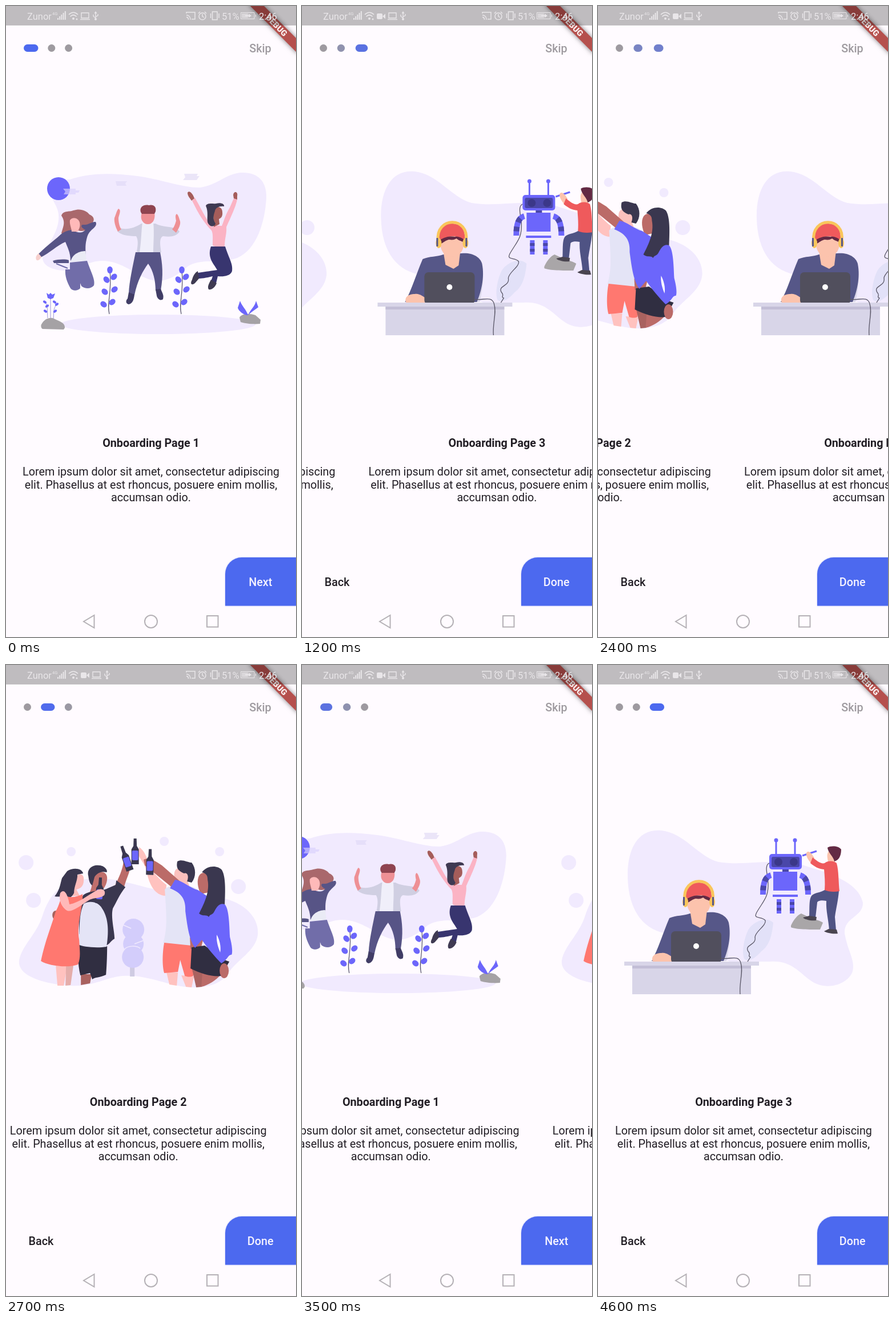
An HTML page with a canvas for the animation above (4.7 s loop, 508 by 1102 pixels).

```html
<!DOCTYPE html>
<html lang="en">
<head>
<meta charset="utf-8">
<title>Onboarding</title>
<style>
html, body { margin: 0; width: 100%; height: 100%; overflow: hidden; background: #fffbff; }
canvas { display: block; width: 508px; height: 1102px; }
</style>
</head>
<body>
<canvas id="stage"></canvas>
<script>
const W = 508, H = 1102, LOOP = 4700, STEP = 100;
const canvas = document.getElementById('stage');
const g = canvas.getContext('2d');
const dpr = window.devicePixelRatio || 1;
canvas.width = W * dpr;
canvas.height = H * dpr;

const BLUE = '#4c69ef', VIOLET = '#6c66fb', LILAC = '#f1eafe', INK = '#221e25';
const NAVY = '#3a374f', NIGHT = '#302e41', CORAL = '#ff7870';
const BROWN = '#bb6b68', UMBER = '#a9625f', ROSE = '#ffc2bf', STATUS = '#e9e6e9';

// ---- drawing helpers ----
const paths = {};
const path = d => paths[d] || (paths[d] = new Path2D(d));
function fill(color, ...list) {
  g.fillStyle = color;
  for (const d of list) g.fill(path(d));
}
function line(color, width, ...list) {
  g.strokeStyle = color;
  g.lineWidth = width;
  for (const d of list) g.stroke(path(d));
}
function oval(color, x, y, rx, ry = rx, turn = 0) {
  g.fillStyle = color;
  g.beginPath();
  g.ellipse(x, y, rx, ry, turn, 0, 7);
  g.fill();
}
function rect(color, x, y, w, h, r = 0) {
  g.fillStyle = color;
  g.beginPath();
  g.roundRect(x, y, w, h, r);
  g.fill();
}
function text(s, x, y, { color = INK, size = 19.76, weight = 400, align = 'center' } = {}) {
  g.font = `${weight} ${size}px Roboto, sans-serif`;
  g.textAlign = align;
  g.fillStyle = color;
  g.fillText(s, x, y);
}
function at(x, y, turn, draw) {
  g.save();
  g.translate(x, y);
  g.rotate(turn);
  draw();
  g.restore();
}
function shaded(color, blur, draw) {
  g.save();
  g.shadowColor = color;
  g.shadowBlur = blur * dpr;
  draw();
  g.restore();
}

// ---- page 1: jumping friends ----
function sprig() {
  line('#55526b', 1.2, 'M181 538C176 518 186 500 182 462');
  [[182, 461, 0], [189, 473, .8], [176, 478, -.7], [190, 495, .9], [173, 499, -.8], [186, 517, .9], [171, 521, -.9]]
    .forEach(([x, y, a]) => oval(VIOLET, x, y, 4.8, 6.2, a));
}
function jumpers() {
  fill(LILAC, 'M112 303C150 290 190 292 230 297C270 302 310 318 340 317C370 313 385 293 412 291C440 290 457 305 456 335C454 375 440 425 405 440C375 450 340 440 318 455C300 470 285 480 265 480C235 478 215 452 180 446C145 440 125 465 100 462C70 460 55 445 70 425C85 400 100 375 88 350C80 335 76 325 78 312C85 300 95 303 112 303Z');
  oval(LILAC, 266, 556, 171, 17);
  oval(VIOLET, 92, 319, 20);
  fill('rgba(216,208,252,.65)', 'M100 319L122 319L122 322L129 322L127 326L122 326L122 329L101 329L104 324Z');
  fill('#e6dff9', 'M192 306L212 306L209 310L211 314L194 314Z');
  fill('#ebe5f8', 'M312 293L336 293L334 297L339 297L336 301L334 304L310 304L314 299Z');

  // woman on the left
  fill('#a9686c', 'M97 366C100 357 110 360 118 357C130 353 141 357 146 364C156 368 156 377 148 381C146 393 130 396 123 390C112 399 102 401 97 397C100 385 105 378 97 366Z');
  fill('#575486', 'M57 433C75 415 88 407 97 398C104 393 110 392 115 391C125 396 133 398 139 391C133 388 130 384 134 382C145 383 150 376 157 377C160 382 156 386 150 391C144 397 143 400 141 408C138 420 140 428 139 435C131 428 125 432 113 445C113 430 107 420 104 412C90 418 75 432 61 439Z');
  fill('#ffb9b9', 'M112 374C118 367 127 371 129 378C131 386 127 390 126 394L115 394C115 388 111 382 112 374Z');
  fill('#f7cfcd', 'M57 432L62 438C60 443 55 446 53 443C51 438 54 435 57 432Z');
  fill('#eaebf5', 'M139 428L141 445L113 447C116 432 130 428 139 428Z');
  fill('#716da9', 'M112 448L142 445C148 463 157 478 154 488C148 495 138 494 132 489L130 484L130 493C125 498 117 498 113 493C107 482 103 472 104 460L112 460Z');
  fill('#575486', 'M82 445C92 442 105 442 110 444L110 449L84 449Z');
  line('#716da9', 2, 'M88 450L108 458');

  // man in the middle
  fill('#d0cfe2', 'M197 387C210 392 225 388 237 380L262 380C268 384 280 385 299 388L304 394C298 402 290 404 275 402C268 405 270 418 272 430C262 433 235 432 229 429C231 418 232 408 228 402C215 402 200 400 195 393Z');
  fill('#f0effa', 'M239 378C245 382 252 382 258 378C260 395 258 415 258 430L234 430C237 412 237 392 239 378Z');
  fill('#ee9095',
    'M238 361C245 359 255 359 260 361C262 370 258 377 256 378C253 382 243 382 240 377C236 373 236 366 238 361Z',
    'M197 354C202 356 199 362 197 370C197 378 199 386 202 390L196 394C191 385 189 375 190 370C193 363 194 357 197 354Z',
    'M299 363C296 365 297 370 298 375C296 382 294 387 291 390L298 396C303 388 306 382 305 376C303 370 302 365 299 363Z');
  fill('#8f4450', 'M236 360C233 350 243 346 250 348C258 346 264 350 262 359L260 363L238 363Z');
  fill('#575486', 'M227 430L270 430C274 450 276 470 271 497L262 497C262 480 258 462 249 450C240 462 230 480 225 505L215 502C216 480 222 455 227 430Z');
  fill('#413d66',
    'M215 500L225 504C224 512 222 520 215 521C210 520 209 515 213 511Z',
    'M262 495L271 494C274 502 277 505 275 512C270 516 265 511 264 506Z');

  // woman on the right
  fill('#fbb3c4', 'M360 386C367 382 375 384 378 384C382 375 384 365 392 352L399 336L405 338C402 352 394 368 386 386C387 398 383 405 383 420C375 422 366 421 362 418C362 405 363 398 360 392C348 380 337 363 326 340L331 335C340 350 350 372 360 384Z');
  fill('#a55d5a',
    'M363 354C372 348 379 352 379 360C380 368 376 371 373 372L374 381L364 386C364 372 362 362 363 354Z',
    'M318 326C321 321 327 327 330 336L325 340C322 335 318 332 318 326Z',
    'M398 330C399 322 407 324 405 332L405 338L399 336Z');
  fill('#3f3a52', 'M350 349C353 343 362 346 368 345C375 343 383 345 382 350C374 349 367 352 366 358C363 367 362 372 367 380C366 386 358 386 355 381C350 375 356 362 350 349Z');
  fill('#38356f', 'M359 420L384 420C390 440 398 450 396 463C393 472 380 473 371 472L368 484L359 481L362 472C350 475 342 476 337 476L336 466C350 464 362 462 370 461C364 450 352 440 359 420Z');
  fill('#3f3a52',
    'M336 463L338 476L331 484C325 489 322 485 326 478C328 470 332 465 336 463Z',
    'M359 478L369 484C366 492 360 496 355 495C352 490 356 484 359 478Z');

  sprig();
  at(126, 0, 0, sprig);
  fill('#a5a2a5',
    'M62 556C68 545 78 543 84 546C92 550 104 553 103 562L101 565L64 564C61 562 61 558 62 556Z',
    'M409 544C413 537 425 536 437 540L446 548L445 555C435 556 420 555 411 552Z');
  line('#9b96d8', 1, 'M78 510L78 545', 'M69 518C74 525 72 536 73 545', 'M89 521C82 528 84 538 83 546');
  fill(VIOLET, 'M71 501L75 504L78 501L81 504L86 502L83 510L78 512L73 510Z',
    'M424 540C416 540 407 532 406 527L410 515C413 524 421 530 424 540Z',
    'M424 540C428 530 436 525 438 515L442 526C437 530 430 534 424 540Z');
  [[68, 517], [72, 524], [85, 517], [89, 521], [69, 533], [86, 533]]
    .forEach(([x, y], i) => oval(VIOLET, x, y, 3.4, 2.2, i % 2 ? -.6 : .6));
}

// ---- page 2: raising bottles ----
function bottle(x, y, turn) {
  at(x, y, turn, () => {
    fill(NAVY, 'M-2.5 -23L2.5 -23L3 -10L6.5 -4L6.5 22L-6.5 22L-6.5 -4L-3 -10Z');
    rect(VIOLET, -5.5, -2, 11, 17, 2);
  });
}
function toast() {
  [[32, 345, 13], [45, 411, 13], [111, 326, 8], [274, 308, 8], [371, 326, 8], [404, 387, 13]]
    .forEach(([x, y, r]) => oval(LILAC, x, y, r));
  fill(LILAC, 'M20 515C25 490 50 470 60 440C70 410 85 380 130 375C170 370 190 375 230 385C290 402 340 400 380 408C420 418 440 445 438 470C435 500 400 515 385 540C370 560 340 566 310 562C270 556 240 540 200 543C170 546 150 562 110 560C70 558 15 545 20 515Z');
  rect('#cfcbe2', 214, 525, 8, 19);
  oval('#d3cdfb', 220, 462, 19);
  oval('#d3cdfb', 220, 487, 18);
  oval('#d3cdfb', 219, 510, 19);
  line(LILAC, 1.5, 'M202 454L216 460', 'M238 481L222 487', 'M204 497C210 489 226 490 232 495');

  // couple on the left
  fill(ROSE, 'M84 525L104 526L98 560L87 560Z');
  fill('#e5adaa', 'M102 526L115 524L110 559L101 560Z');
  fill(UMBER, 'M128 540L147 540L144 556L128 559Z');
  fill('#c06f6c', 'M152 365C160 358 174 360 174 372C174 384 168 390 162 398L142 400C150 386 146 374 152 365Z');
  fill(NAVY, 'M141 368C138 355 150 348 160 350C170 350 176 360 173 362C165 360 158 362 152 370L148 385C143 382 142 375 141 368Z');
  fill(BROWN, 'M187 387C195 370 201 358 203 342L215 345C216 360 208 370 203 391Z');
  fill(NAVY, 'M132 402C145 392 165 396 175 390L189 384L190 376L206 388C196 400 190 415 184 425C180 440 187 465 187 478C180 482 178 488 172 490L125 470C125 450 122 420 132 402Z');
  fill(NIGHT, 'M123 486L174 491C174 510 173 530 172 541C162 546 152 545 148 549L144 538L127 542C122 520 123 500 123 486Z');
  fill('#e4e4f6', 'M133 417C145 410 160 415 165 425C175 440 178 460 173 492C155 495 130 492 123 488C128 470 122 440 133 417Z');
  oval('#a5625c', 84, 437, 6, 8);
  fill('#fdbcba', 'M121 368C127 363 134 366 133 376C133 388 125 391 120 392L126 403L104 404C114 390 116 380 121 368Z');
  fill(NAVY, 'M104 360C115 353 130 355 132 364L122 366C122 378 116 386 116 398C112 406 105 410 101 404C95 402 92 406 82 404C92 392 92 380 95 372Z');
  fill(CORAL, 'M97 400C105 408 120 406 131 400C132 425 120 450 125 480C126 500 128 510 123 523C105 530 70 525 58 517C66 480 75 460 84 430C90 420 92 408 97 400Z');
  bottle(161, 394, .06);
  fill('#ffb9b9', 'M92 398C100 388 106 405 108 418C125 415 140 402 155 394C165 388 173 394 169 402C160 409 150 405 140 412C125 422 112 432 104 429C95 424 88 410 92 398Z');

  // couple on the right
  fill(ROSE, 'M278 537L298 537L296 560L283 558Z', 'M304 542L326 544L322 563L312 562Z',
    'M230 318C239 324 244 335 247 350L255 362C264 372 270 378 278 384L276 403C258 402 248 385 243 360C241 348 232 340 229 332Z');
  fill('#fbc0bd', 'M292 362C295 350 308 355 312 362C320 358 318 370 315 378L322 395L298 395L298 380C290 375 291 368 292 362Z');
  fill(NAVY, 'M297 343C305 338 315 345 322 345C330 355 330 370 322 380L314 378C318 368 314 362 309 364C300 360 294 356 297 343Z');
  fill('#e4e4f6', 'M275 392C285 380 325 382 335 395L330 490C310 492 290 490 272 486C280 460 278 440 275 392Z');
  fill(CORAL, 'M274 485L322 490L325 543C318 546 313 544 310 543L302 515L298 536L274 538C270 525 271 500 274 485Z');
  fill(UMBER, 'M322 528L342 535L340 562L330 563Z');
  fill(BROWN, 'M341 534L374 540C364 551 352 559 339 562Z', 'M319 476L342 480L338 496L320 496Z',
    'M335 368C340 360 350 362 352 372L352 397L338 400C332 388 331 375 335 368Z',
    'M238 340C246 335 258 342 270 350L302 378L292 392C275 378 255 362 240 350Z');
  fill(NIGHT, 'M322 493L345 490C360 500 368 512 388 518L374 543C360 545 340 540 320 530Z');
  oval(BROWN, 379, 534, 8, 13);
  fill(VIOLET, 'M293 375C305 376 320 390 333 393L356 408L380 418C387 425 388 450 389 475C393 490 394 502 392 506C386 505 385 515 374 521C365 512 350 495 340 480L328 494C318 480 315 460 311 430C312 410 305 398 284 390Z');
  fill('#fffbff', 'M366 471C371 480 374 492 372 502C368 492 365 482 366 471Z');
  fill(NAVY, 'M340 362C350 349 368 350 375 358C382 370 381 395 380 418C372 415 367 420 362 430C358 438 355 434 352 440C348 435 342 440 335 434C345 415 354 395 350 375C350 368 348 364 340 362Z');
  bottle(207, 338, -.33);
  bottle(223, 326, 0);
  bottle(249, 344.5, .02);
}

// ---- page 3: desk and robot ----
function workshop() {
  const dark = '#4a47a8', red = '#ef5a5c', skin = '#fcc3ad', plum = '#632a44';
  fill(LILAC, 'M51 370C50 320 70 285 110 289C150 293 175 335 210 344C260 352 310 335 360 350C390 360 455 375 463 415C464 440 430 440 431 468C436 500 450 515 445 535C436 560 395 570 370 550C350 535 335 515 300 518L230 518C200 505 150 500 125 470C80 465 52 430 51 370Z');
  fill('#e2e1f8', 'M262 463C270 448 295 438 306 450C304 470 300 490 285 500C275 512 262 520 255 513C250 500 256 475 262 463Z');

  fill('#dcd8ea', 'M210 434C232 440 234 470 224 517L215 517Z');
  fill('#565788', 'M93 517C105 495 112 470 124 442C135 437 150 438 160 434L192 432C210 430 225 438 228 450C233 475 226 500 219 517Z');
  fill(skin, 'M160 428L190 428L187 453L178 459L164 452Z',
    'M155 400L196 400C198 420 195 436 175 438C155 436 153 418 155 400Z',
    'M95 518C91 508 100 503 110 503C118 501 125 508 130 510L130 518Z');
  fill(plum, 'M154 408C162 400 176 402 186 404C176 412 172 406 167 409C160 412 158 415 155 415Z', 'M180 403C190 400 198 405 197 413C191 410 186 410 180 403Z');
  fill(red, 'M152 410C151 387 162 380 175 380C190 380 199 388 198 409C188 400 168 399 152 410Z');
  line('#f9c65b', 5, 'M151 410C146 367 206 367 200 410');
  oval('#f9c65b', 152, 414, 5, 9);
  oval('#f9c65b', 199, 414, 5, 9);
  rect('#565788', 148, 405, 3, 15, 1);
  rect('#565788', 199, 405, 3, 15, 1);
  rect('#514f5d', 127, 465, 88, 56, 7);
  oval('#ffffff', 171, 491, 5);
  rect('#d8d5e8', 59, 525, 208, 50);
  rect('#c2bed6', 59, 525, 208, 5);
  rect('#d8d5e8', 45, 518, 236, 7);
  line('#5a5767', 1.3, 'M214 512C230 515 245 505 249 520C254 535 246 555 248 575',
    'M299 346C290 350 296 365 297 380C298 405 290 410 277 432C270 445 285 438 292 446C294 455 275 465 274 475C277 490 255 488 262 500C268 506 260 508 266 510L261 518');

  // robot
  for (const x of [311, 344]) {
    rect(VIOLET, x - 1.5, 306, 3, 26);
    oval(VIOLET, x, 306, 3.5);
  }
  rect(VIOLET, 299, 330, 57, 27, 5);
  rect(dark, 303, 335, 49, 18, 3);
  oval('#3b3889', 315, 344, 7);
  oval('#3b3889', 342, 344, 7);
  rect(dark, 322, 357, 11, 4);
  rect(VIOLET, 306, 361, 42, 33);
  rect(VIOLET, 305, 401, 44, 4);
  for (const x of [312, 335]) {
    rect(VIOLET, x, 409, 8, 25);
    rect(dark, x, 414, 8, 5);
    rect(dark, x, 424, 8, 5);
  }
  for (const d of ['M302 367C292 370 288 380 288 401', 'M353 367C363 370 367 380 367 401']) {
    line(VIOLET, 10, d);
    g.setLineDash([8, 8]);
    g.lineDashOffset = 8;
    line(dark, 10, d);
    g.setLineDash([]);
  }

  // boy with a pen
  fill('#a9a6a8', 'M337 455C343 442 350 436 355 434L368 440C380 445 390 447 393 450L388 462C370 462 345 462 337 458Z');
  line(VIOLET, 3, 'M357 333L382 325');
  fill(skin, 'M364 328C368 322 374 330 378 337L372 346C367 340 363 334 364 328Z', 'M401 330C403 320 414 324 416 332C417 340 414 344 412 346L402 344C401 337 400 333 401 330Z');
  fill(plum, 'M401 319C408 315 420 316 425 322C425 335 420 341 413 343C412 335 402 328 401 319Z');
  fill('#4f5384', 'M396 393L421 394C420 410 416 425 414 440L416 463L404 463C403 445 398 430 399 412C390 410 383 412 383 415L380 441L369 440C370 425 368 408 374 402C380 397 388 398 396 393Z');
  fill(red, 'M396 346C403 341 412 342 417 346C421 360 420 380 422 395C412 397 403 396 396 393C397 380 396 368 395 357C385 356 378 352 371 346L375 336C382 342 390 348 396 346Z');
  fill('#4a4550', 'M369 438L382 440L381 446C372 447 362 445 358 441Z', 'M403 461L417 462L419 469C410 470 400 468 395 465Z');
}

// ---- motion ----
const SKIP = 200;
// start, from, to, rate and power of the decay
const swipes = [
  [600, 2, 1, .463, 1.7],
  [1100, 1, 2, .44, 2],
  [2400, 2, 1, .592, 1.2],
  [3000, 1, 0, .916, 1.67],
  [3500, 0, 1, .215, 1.7],
  [4200, 1, 2, .344, 1.8]
];
function pageAt(t) {
  if (t < SKIP) return 0;
  let page = 2;
  for (const [start, from, to, rate, power] of swipes) {
    if (t < start) break;
    const n = (t - start) / STEP + 1;
    const rest = Math.exp(-rate * n ** power);
    page = to + (rest < .0015 ? 0 : (from - to) * rest);
  }
  return page;
}
const glowAt = t => t < 1400 || t >= 1900 ? 0 : t <= 1500 ? (t - 1300) / 200 : (1900 - t) / 400;

// ---- screen parts ----
const scenes = [[jumpers, 0], [toast, 25.5], [workshop, 0]];
const lorem = ['Lorem ipsum dolor sit amet, consectetur adipiscing', 'elit. Phasellus at est rhoncus, posuere enim mollis,', 'accumsan odio.'];

function pages(page) {
  scenes.forEach(([draw, shift], i) => {
    const x = (i - page) * W;
    if (Math.abs(x) >= W) return;
    at(x, 0, 0, () => {
      at(shift, 0, 0, draw);
      text('Onboarding Page ' + (i + 1), 254, 769.5, { weight: 700 });
      lorem.forEach((s, k) => text(s, 254, 820 + k * 22.6));
    });
  });
}
function dots(page) {
  const mix = (a, b, k) => Math.round(a + (b - a) * k);
  let left = 31;
  for (let i = 0; i < 3; i++) {
    const k = Math.max(0, 1 - Math.abs(page - i));
    const slot = 13 + 12.5 * k, w = 13 + 12.5 * k * k;
    rect(`rgb(${mix(158, 76, k)},${mix(154, 105, k)},${mix(160, 239, k)})`, left + (slot - w) / 2, 67, w, 13, 6.5);
    left += slot + 16.8;
  }
}
function glow(k) {
  if (!k) return;
  g.globalAlpha = k;
  const edge = W - 10 * k, bulge = W - 28 * k;
  g.fillStyle = '#c6d6fe';
  g.beginPath();
  g.moveTo(W, 113);
  g.lineTo(edge, 113);
  g.quadraticCurveTo(bulge, 538, edge, 963);
  g.lineTo(W, 963);
  g.fill();
  g.globalAlpha = 1;
}
function controls(page) {
  const medium = { weight: 500 };
  text('Skip', 445.5, 80.5, { ...medium, color: '#9e9a9f' });
  if (page >= 1) text('Back', 61.5, 1012.5, medium);
  shaded('rgba(76,105,239,.5)', 2, () => rect(BLUE, 384, 963, 126, 84.5, [29, 0, 0, 0]));
  text(page > 1 ? 'Done' : 'Next', 445.7, 1012.5, { ...medium, color: '#f6f3ff' });
  line('#b5b1b6', 2, 'M154.5 1064L154.5 1086L136 1075Z', 'M265 1075A11 11 0 1 1 243 1075A11 11 0 1 1 265 1075Z', 'M352 1065H371.5V1084.5H352Z');
}
function ribbon() {
  at(W, 0, Math.PI / 4, () => {
    shaded('rgba(0,0,0,.5)', 9, () => rect('#b5504d', -60, 39.6, 120, 17));
    text('DEBUG', 0, 53.2, { color: '#fbf0f0', size: 14.4, weight: 900 });
  });
}
function statusBar(recording) {
  rect('rgba(0,0,0,.25)', 0, 0, W, 34);
  const label = { color: STATUS, size: 16.5, align: 'left' };
  text('Zunor', 37, 23.5, label);
  text('4G', 81, 16, { ...label, size: 7.5 });
  for (let i = 0; i < 5; i++) rect(STATUS, 90 + i * 3.2, 21 - i * 3, 2, 3 + i * 3);
  line(STATUS, 1.7, 'M110 15C115 10 121 10 126 15', 'M112.5 18.5C116 15 120 15 123.5 18.5');
  oval(STATUS, 118, 22, 2);
  oval(STATUS, 124, 23, 1.5);
  if (recording) {
    rect(STATUS, 131, 13, 10, 10, 2);
    fill(STATUS, 'M141 18L146 13.5V22.5Z');
  }
  at(recording ? 20 : 0, 0, 0, () => {
    line(STATUS, 1.4, 'M132 12H145V21H132Z', 'M130 23.5H147', 'M157 24V11', 'M157 21L153 18V15', 'M157 19L161 16.5V14');
    fill(STATUS, 'M154.5 13L157 9L159.5 13Z');
    oval(STATUS, 157, 23, 2);
  });
  line(STATUS, 1.5, 'M316 13V11H331V23H325', 'M316 16C320 16 323 19 323 24', 'M316 19.5C318 19.5 319.5 21 319.5 24',
    'M350 18A6 6 0 1 1 338 18A6 6 0 1 1 350 18Z', 'M344 14V18L347 20', 'M337 13L340 10', 'M351 13L348 10',
    'M361.5 10H370V24H361.5Z', 'M358.5 13V21', 'M373 13V21');
  line(STATUS, 1, 'M411.5 11.5H435V22.5H411.5Z', 'M437.5 15V19');
  fill('#dad7da', 'M413 13H424V21H413Z');
  fill(STATUS, 'M419 16H425V13.5L430 17L425 20.5V18H419Z');
  text('51%', 378, 23.5, label);
  text('2:46', 443, 23.5, label);
}

function draw(t) {
  const page = pageAt(t);
  g.setTransform(dpr, 0, 0, dpr, 0, 0);
  g.fillStyle = '#fffbff';
  g.fillRect(0, 0, W, H);
  pages(page);
  glow(glowAt(t));
  dots(page);
  controls(page);
  ribbon();
  statusBar(t >= SKIP);
}

const begin = performance.now();
function tick() {
  const t = (performance.now() - begin) % LOOP;
  draw(Math.floor(t / STEP) * STEP);
  requestAnimationFrame(tick);
}
tick();
</script>
</body>
</html>
```
